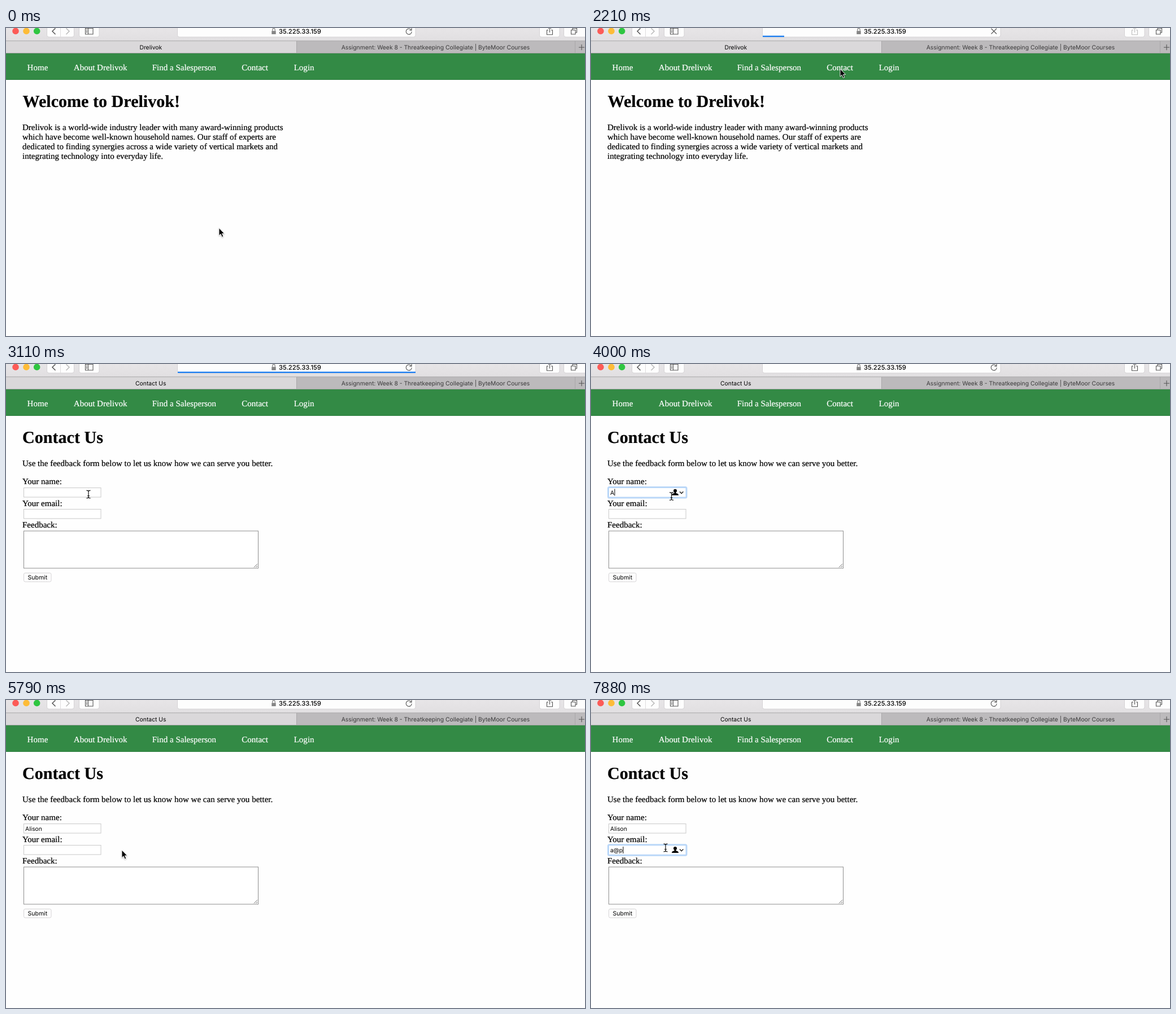
Recreate the animation shown at these times as an HTML page. Size 1025 by 546 pixels, loop 8 s.

```html
<!DOCTYPE html>
<html lang="en">
<head>
<meta charset="utf-8">
<title>Contact form</title>
<style>
html, body { margin: 0; width: 100%; height: 100%; overflow: hidden; background: #fff; }
svg { display: block; width: 100%; height: 100%; }
text { white-space: pre; text-rendering: geometricPrecision; }
.ui { font-family: Inter, Roboto, sans-serif; font-size: 10.35px; fill: #000; }
.page { font-family: "Liberation Serif", "Noto Serif", serif; font-size: 15.03px; stroke: #000; stroke-width: .22; }
.menu { fill: #fff; stroke: #fff; }
.h1 { font-size: 30.1px; font-weight: bold; }
.mid { text-anchor: middle; }
.line { fill: none; stroke: #555; stroke-width: 1.1; }
.btn { fill: #fdfdfd; stroke: #cdcbcd; stroke-width: .8; }
.box { fill: #fff; stroke: #c9c9c9; }
</style>
</head>
<body>
<svg viewBox="0 0 1025 546" preserveAspectRatio="none">
  <defs>
    <linearGradient id="bar" x2="0" y2="1">
      <stop offset="0" stop-color="#e7e5e7"/><stop offset="1" stop-color="#e1dfe1"/>
    </linearGradient>
    <filter id="soft" x="-20%" y="-40%" width="140%" height="200%">
      <feDropShadow dx="0" dy="2" stdDeviation="2.5" flood-opacity=".3"/>
    </filter>
    <filter id="shade" x="-50%" y="-30%" width="200%" height="180%">
      <feDropShadow dx="0" dy="1" stdDeviation=".8" flood-opacity=".35"/>
    </filter>
    <g id="autofill">
      <circle cx="149" cy="-3" r="3"/>
      <path d="M147.5-1h3v2.2q4.6.7 4.6 3.8h-12.2q0-3.1 4.6-3.8z"/>
      <path d="M157-1.5l3.2 3.2 3.2-3.2" fill="none" stroke="#222" stroke-width="1.5"/>
    </g>
  </defs>

  <rect width="1025" height="546" fill="#fefefe"/>

  <!-- toolbar -->
  <rect width="1025" height="23" fill="url(#bar)"/>
  <circle cx="17" cy="5.5" r="5.8" fill="#fc5b57"/>
  <circle cx="36" cy="5.5" r="5.8" fill="#fdbc38"/>
  <circle cx="54.7" cy="5.5" r="5.8" fill="#2fc641"/>
  <g class="btn">
    <rect x="72.5" y="-8" width="48" height="24" rx="3.5"/>
    <rect x="129.5" y="-8" width="35.5" height="24" rx="3.5"/>
    <rect x="303.5" y="-8" width="421.5" height="24" rx="3.5"/>
    <rect x="944.5" y="-8" width="35.5" height="24" rx="3.5"/>
    <rect x="987.5" y="-8" width="45" height="24" rx="3.5"/>
  </g>
  <path d="M96.5 0V16" stroke="#dddbdd"/>
  <path class="line" d="M87.5 0.5L82 5.8 87.5 11.2" style="stroke-width:1.5"/>
  <path class="line" d="M106.5 0.5L112 5.8 106.5 11.2" style="stroke:#b9b9b9;stroke-width:1.5"/>
  <path class="line" d="M140.5 0.5h13.5v10.5h-13.5zM145.5 0.5V11M142 3h2M142 5.2h2M142 7.4h2"/>
  <path d="M470.3 5.2h7.4v5.8h-7.4z" fill="#858585"/>
  <path class="line" d="M471.8 5.5V3a2.2 2.4 0 0 1 4.4 0V5.5" style="stroke:#858585;stroke-width:1.2"/>
  <text class="ui" x="483" y="10" style="font-size:11.2px;font-weight:500">35.225.33.159</text>
  <rect id="load" x="304" y="13.6" height="2.4" fill="#1f7ff0"/>
  <path id="reload" class="line" d="M717.4 3.6A5 5 0 1 0 718.2 6.5M718 0V4h-4"/>
  <path id="stop" class="line" d="M708.5 1l9.5 9.5M718 1l-9.5 9.5"/>
  <path id="share" class="line" d="M960 3.7h-2.5v8h10v-8H965M962.5 8V-1M959.8 1.2L962.5-1.5 965.2 1.2"/>
  <path class="line" d="M1000.5 3.5h7.5v7.5h-7.5zM1003 3.5V0.5h7.5V8H1008"/>

  <!-- tabs -->
  <rect y="23" width="514.5" height="22" fill="#dad8da"/>
  <rect x="514.5" y="23" width="511" height="22" fill="#bcbabc"/>
  <path d="M0 22.8H1025M514.5 23V45M1007.5 23V45" stroke="#a9a7a9" fill="none"/>
  <path d="M0 44.5H1025" stroke="#a3a5a3"/>
  <path class="line" d="M1014 34.3h10M1019 29.3v10"/>
  <text class="ui mid" id="tab" x="256.3" y="38"></text>
  <text class="ui mid" x="760.5" y="38" style="fill:#3a393a">Assignment: Week 8 - Threatkeeping Collegiate | ByteMoor Courses</text>

  <!-- site menu -->
  <rect y="45" width="1025" height="47" fill="#338a45"/>
  <path d="M0 91.5H1025" stroke="#2f7f40"/>
  <g class="page menu">
    <text x="37.6" y="74.7">Home</text>
    <text x="119.8" y="74.7">About Drelivok</text>
    <text x="258.7" y="74.7">Find a Salesperson</text>
    <text x="417.2" y="74.7">Contact</text>
    <text x="509.7" y="74.7">Login</text>
  </g>

  <g id="home" class="page">
    <text class="h1" x="29.5" y="140">Welcome to Drelivok!</text>
    <text x="29" y="181">Drelivok is a world-wide industry leader with many award-winning products</text>
    <text x="29" y="198">which have become well-known household names. Our staff of experts are</text>
    <text x="29" y="215">dedicated to finding synergies across a wide variety of vertical markets and</text>
    <text x="29" y="232">integrating technology into everyday life.</text>
  </g>

  <g id="contact">
    <g class="page">
      <text class="h1" x="29" y="140">Contact Us</text>
      <text x="29" y="181">Use the feedback form below to let us know how we can serve you better.</text>
      <text x="29" y="213">Your name:</text>
      <text x="29" y="251.5">Your email:</text>
      <text x="29" y="290">Feedback:</text>
    </g>
    <rect class="box" x="31.5" y="219.5" width="136.5" height="16.5"/>
    <rect class="box" x="31.5" y="257.5" width="136.5" height="16.5"/>
    <rect class="box" x="31.5" y="296" width="415" height="66" style="stroke:#8e8e8e"/>
    <path class="line" d="M439 360.5l6-6M442.5 360.5l2.5-2.5" style="stroke-width:.9"/>
    <rect class="btn" x="31.5" y="370.5" width="48.5" height="15.5" rx="2.5"/>
    <text class="ui mid" x="55.8" y="382" style="font-size:10.5px">Submit</text>
    <g id="focus">
      <rect x="30.5" y="-9.3" width="138.5" height="18.6" rx="2" fill="#fff" stroke="#bad7f8" stroke-width="3"/>
      <use href="#autofill"/>
    </g>
    <text class="ui" id="name" x="34" y="231.5"></text>
    <text class="ui" id="mail" x="34" y="270"></text>
    <rect id="caret" width="1" height="12"/>
    <g id="popup">
      <rect x="30.5" y="238" width="106" height="26" rx="4" fill="#eeedee" stroke="#cfcfcf" stroke-width=".7" filter="url(#soft)"/>
      <text class="ui" x="44" y="256" style="font-size:12px;fill:#3d3d3d">Customize...</text>
    </g>
  </g>

  <path id="arrow" d="M0 0V13.6L3.1 10.8 5.4 16 7.8 15 5.5 9.9H9.6Z" stroke="#fff" stroke-width=".9" filter="url(#shade)"/>
  <path id="beam" d="M-3.5-6.8Q0-6.8 0-5V5Q0 6.8-3.5 6.8M3.5-6.8Q0-6.8 0-5V5Q0 6.8 3.5 6.8M-1.8 2.6H1.8" fill="none" stroke="#111" stroke-width="1.2"/>
</svg>
<script>
const LOOP = 8000;
const el = {};
document.querySelectorAll('svg [id]').forEach(n => el[n.id] = n);

// Pointer stops: time, x, y, and 1 for the text beam
const pointer = [
  [0, 377, 354.5], [740, 388, 318], [890, 396, 250], [1030, 385, 170], [1180, 365, 112.5],
  [1480, 412, 98], [1620, 439, 80], [1760, 441, 75], [1910, 441, 72.5],
  [2510, 420, 88], [2660, 350, 128], [2810, 255, 180], [2950, 180, 217],
  [3100, 146, 231, 1], [3250, 142.5, 234.5, 1],
  [5340, 185, 256], [5490, 250, 279], [5640, 279, 269], [5790, 205, 266], [5930, 132, 262, 1]
];
const loading = [[0, 0], [2210, 38], [2360, 56], [2510, 62], [2660, 90], [2810, 240], [2950, 421], [3550, 0]];
const nameKeys = [[0, 0], [3850, 1], [4600, 2], [4750, 3], [4900, 4], [5040, 5], [5190, 6]];
const mailKeys = [[0, 0], [6530, 1], [7130, 2], [7880, 3]];

const at = (keys, t) => keys.findLast(k => k[0] <= t);
const within = (t, a, b) => t >= a && t < b;
const show = (node, on) => node.setAttribute('visibility', on ? 'visible' : 'hidden');
const move = (node, x, y) => node.setAttribute('transform', `translate(${x} ${y})`);
const write = (node, s) => { if (node.textContent !== s) node.textContent = s; };

function draw(t) {
  const onContact = t >= 2360;
  el.home.style.display = onContact ? 'none' : '';
  el.contact.style.display = onContact ? '' : 'none';

  const busy = within(t, 2210, 2950);
  show(el.reload, !busy);
  show(el.stop, busy);
  el.share.style.stroke = busy ? '#bdbdbd' : '';
  el.load.setAttribute('width', at(loading, t)[1]);
  el.load.setAttribute('opacity', t >= 3400 ? 0.4 : 1);
  write(el.tab, t < 2950 ? 'Drelivok' : 'Contact Us');

  const inName = within(t, 3400, 5490);
  const inMail = t >= 6080;
  write(el.name, 'Alison'.slice(0, at(nameKeys, t)[1]));
  write(el.mail, 'a@p'.slice(0, at(mailKeys, t)[1]));
  show(el.focus, inName || inMail);
  move(el.focus, 0, inMail ? 266 : 227.8);

  const field = inMail ? el.mail : el.name;
  const count = field.textContent.length;
  const lag = within(t, 3850, 4000) || within(t, 7130, 7280);
  show(el.caret, (inName || inMail) && !lag);
  const end = onContact && count ? field.getComputedTextLength() : 0;
  move(el.caret, 34.3 + end, inMail ? 260 : 221.5);
  show(el.popup, within(t, 4750, 5490));

  const [, x, y, text] = at(pointer, t);
  show(el.arrow, !text);
  show(el.beam, text);
  move(text ? el.beam : el.arrow, x, y);
}

function tick(now) {
  draw(now % LOOP);
  requestAnimationFrame(tick);
}
draw(0);
requestAnimationFrame(tick);
</script>
</body>
</html>
```
